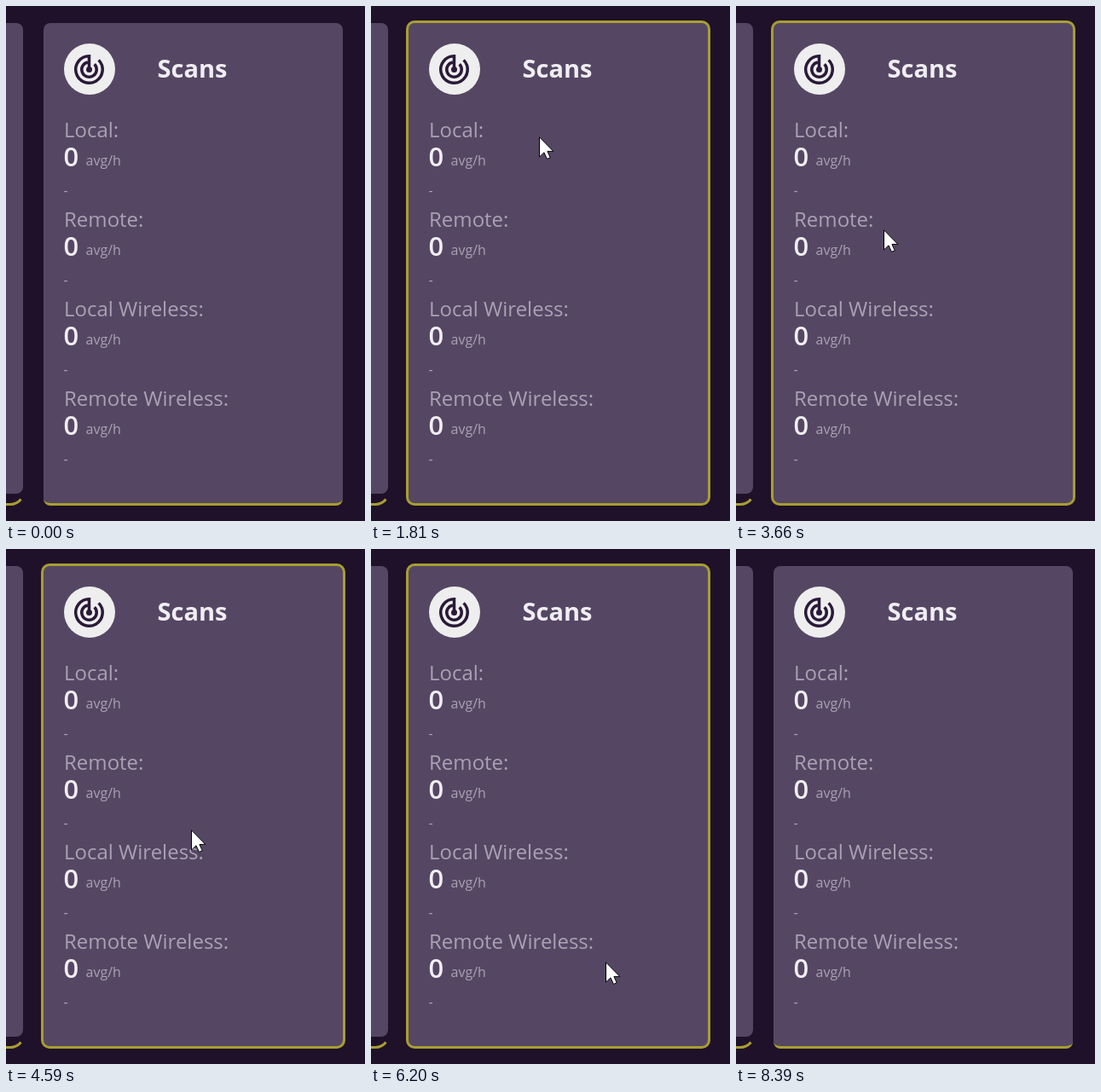
An HTML page that plays this animation: 421x604 px, repeating every 8720 ms.

```html
<!DOCTYPE html>
<html lang="en">
<head>
<meta charset="utf-8">
<title>Scans card</title>
<style>
  html, body { margin: 0; width: 100%; height: 100%; overflow: hidden; background: #1f1129; }
  svg { position: absolute; left: 0; top: 0; font-family: "Open Sans", "Noto Sans", sans-serif; }
  .card, .neighbour { position: absolute; box-sizing: border-box; background: #554764; border-radius: 8px; }
  .neighbour { left: -20px; top: 20px; width: 40px; height: 552px; }
  .card {
    left: 44px; top: 20px; width: 351px; height: 566px;
    border: 0 solid #a89e31; border-bottom-width: 3px;
  }
  .card.hover { left: 41px; top: 17px; width: 357px; height: 569px; border-width: 3px; border-radius: 10px; }
  .title { font-size: 29px; font-weight: 700; fill: #f0eef2; }
  .label { font-size: 24px; font-weight: 500; fill: #aaa1b2; }
  .value { font-size: 31px; font-weight: 600; fill: #f0eef2; }
  .small { font-size: 16px; fill: #aaa1b2; }
</style>
</head>
<body>
<div class="neighbour"></div>
<div class="card" id="card"></div>
<svg width="421" height="604" viewBox="0 0 421 604">
  <path d="M0 584.5H5A16 16 0 0 0 17.5 578.5" fill="none" stroke="#a89e31" stroke-width="3"/>
  <circle cx="98" cy="74" r="30" fill="#eeeeee"/>
  <g transform="translate(76.5 53.5) scale(1.75)" fill="none" stroke="#2a1a38" stroke-width="2">
    <path d="M12 12V3A9 9 0 1 0 18.36 5.64M11 7.1A5 5 0 1 0 15.54 8.46"/>
    <circle cx="12" cy="12" r="2" fill="#2a1a38" stroke="none"/>
  </g>
  <text class="title" x="177.5" y="84">Scans</text>
  <g id="rows"></g>
  <path id="cursor" d="M.5.8V24L6 18.8 9.5 26.4 13.2 24.8 9.9 17.4H16.8Z" fill="#fff" stroke="#000"/>
</svg>
<script>
const LOOP = 8720;
const TICK = 68;
const CARD_RIGHT = 398;
const card = document.getElementById("card");
const cursor = document.getElementById("cursor");

document.getElementById("rows").innerHTML =
  ["Local:", "Remote:", "Local Wireless:", "Remote Wireless:"].map((label, i) => `
    <g transform="translate(0 ${i * 105})">
      <text class="label" x="68" y="153.5">${label}</text>
      <text class="value" x="67.5" y="187.5">0</text>
      <text class="small" x="93.5" y="187">avg/h</text>
      <text class="small" x="67.5" y="222">-</text>
    </g>`).join("");

// Each pointer stroke is a curve from the previous resting place, pulled towards its bend.
const outside = { x: 450, y: 72 };
const strokes = [
  { at: 650, steps: 5, bend: { x: 287, y: 76 }, to: { x: 306, y: 76 } },
  { at: 1190, steps: 2, to: { x: 324, y: 83 } },
  { at: 1530, steps: 8, bend: { x: 186, y: 172 }, to: { x: 165, y: 156 } },
  { at: 2810, steps: 8, bend: { x: 156, y: 200 }, to: { x: 173, y: 251 } },
  { at: 3590, steps: 2, to: { x: 173, y: 262 } },
  { at: 4320, steps: 8, bend: { x: 180, y: 310 }, to: { x: 278, y: 375 } },
  { at: 5660, steps: 9, bend: { x: 262, y: 454 }, to: { x: 275, y: 484 } },
  { at: 8190, steps: 4, bend: { x: 330, y: 462 }, to: { x: 450, y: 445 } },
];

const mix = (a, b, p) => ({ x: a.x + (b.x - a.x) * p, y: a.y + (b.y - a.y) * p });

function pointerAt(time) {
  const index = strokes.filter(s => s.at <= time).length - 1;
  if (index < 0) return outside;
  const from = index ? strokes[index - 1].to : outside;
  const { at, steps, to, bend = mix(from, to, 0.5) } = strokes[index];
  const step = Math.floor((time - at) / TICK + 0.15) + 1;
  const p = Math.min(1, step / steps);
  return mix(mix(from, bend, p), mix(bend, to, p), p);
}

function draw() {
  const { x, y } = pointerAt(performance.now() % LOOP);
  cursor.setAttribute("transform", `translate(${Math.round(x)} ${Math.round(y)})`);
  card.classList.toggle("hover", x < CARD_RIGHT);
  requestAnimationFrame(draw);
}
draw();
</script>
</body>
</html>
```
